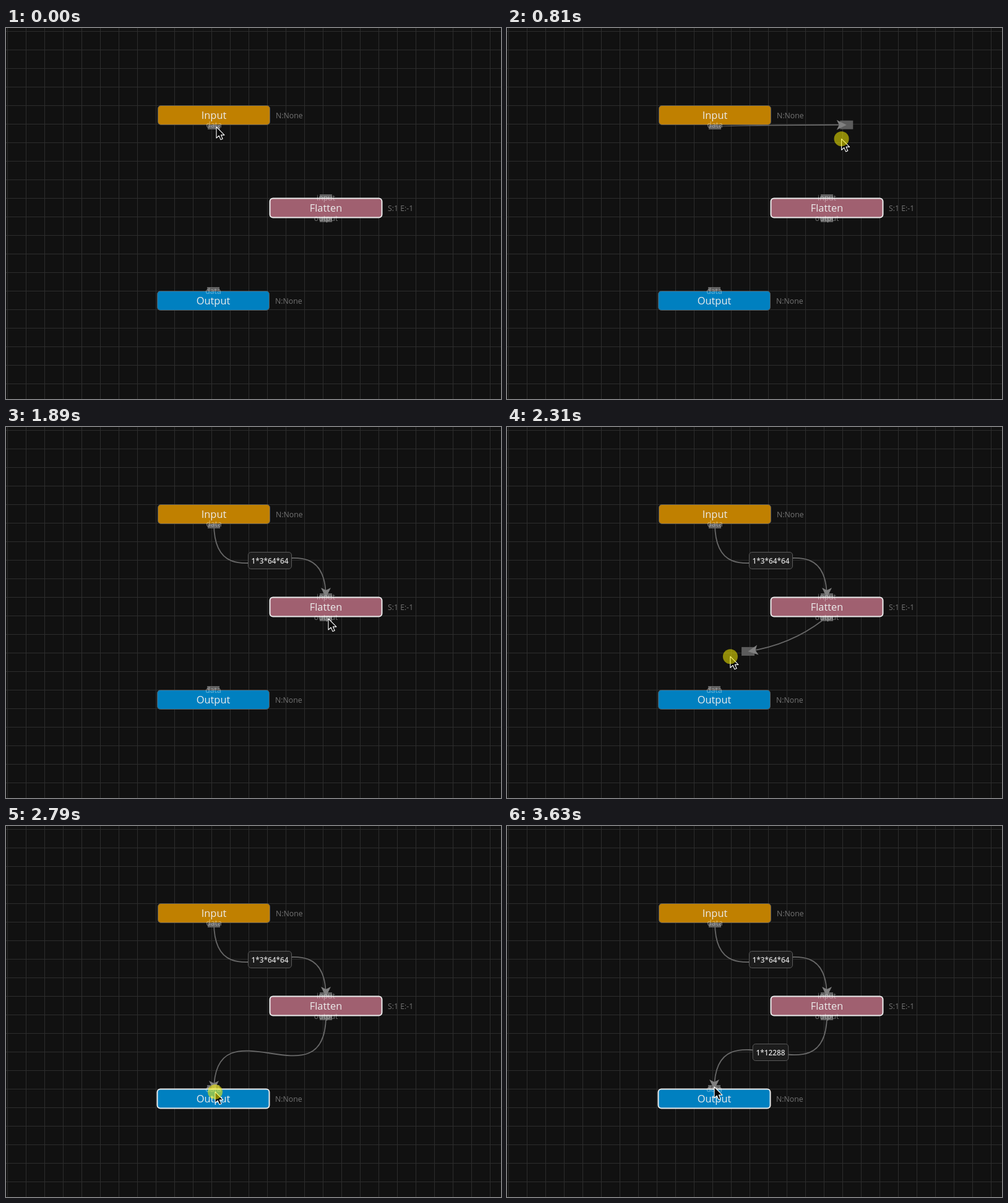
These frames come from a looping animation (800 by 600 pixels, 3.66 s). An HTML page:

```html
<!DOCTYPE html>
<html lang="en">
<head>
<meta charset="utf-8">
<title>Node editor</title>
<style>
html, body { margin: 0; width: 100%; height: 100%; overflow: hidden; background: #111; }
svg { display: block; width: 800px; height: 600px; font-family: "Open Sans", "Noto Sans", sans-serif; }
text { text-anchor: middle; }
.title { font-size: 16.4px; fill: #ececec; }
.side { font-size: 12.3px; fill: #747474; text-anchor: start; }
.port { font-size: 12.2px; fill: #fff; fill-opacity: .42; }
.size { font-size: 11.8px; font-weight: 600; fill: #d8d8d8; }
.link { fill: none; stroke: #686868; stroke-width: 1.8; }
.head { fill: #808080; }
</style>
</head>
<body>
<svg id="stage" viewBox="0 0 800 600">
  <defs>
    <pattern id="grid" x="2" y="5" width="30" height="30" patternUnits="userSpaceOnUse">
      <path d="M.5 0V30M0 .5H30" stroke="#2d2d2d" fill="none"/>
    </pattern>
  </defs>
  <rect width="800" height="600" fill="#111"/>
  <rect width="800" height="600" fill="url(#grid)"/>
  <g id="ports"></g>
  <g id="links"></g>
  <g id="nodes"></g>
  <g id="labels"></g>
  <path id="cursor" d="M0 0V18L4.2 14.2L7 20.6L10.2 19.2L7.4 13.1H13Z" fill="#060606" stroke="#fff" stroke-width="1.1" stroke-linejoin="round"/>
  <circle id="press" r="12" fill="#fff500" fill-opacity=".53"/>
</svg>
<script>
const LOOP = 3660, STEP = 30;
const $ = id => document.getElementById(id);

function add(parent, tag, attrs, text) {
  const el = document.createElementNS("http://www.w3.org/2000/svg", tag);
  for (const k in attrs) el.setAttribute(k, attrs[k]);
  if (text) el.textContent = text;
  parent.appendChild(el);
  return el;
}
const set = (el, attrs) => { for (const k in attrs) el.setAttribute(k, attrs[k]); };
const show = (el, on) => el.setAttribute("visibility", on ? "visible" : "hidden");

function addPort(cx, y, name, baseline) {
  add($("ports"), "rect", { x: cx - 10, y, width: 20, height: 14, fill: "#626262" });
  return () => add($("nodes"), "text", { x: cx, y: baseline, class: "port" }, name);
}

function addNode(x, y, fill, title, side) {
  const box = add($("nodes"), "rect", { x: x + .5, y: y + .5, width: 181, height: 31, rx: 5, fill });
  add($("nodes"), "text", { x: x + 91, y: y + 22, class: "title" }, title);
  add($("nodes"), "text", { x: x + 191, y: y + 21, class: "side" }, side);
  return box;
}
const select = (box, on) => set(box, { stroke: on ? "#ebebeb" : "#5c5c5c", "stroke-width": on ? 2 : 1 });

function addLabel(cx, cy, w, text) {
  const g = add($("labels"), "g", {});
  add(g, "rect", { x: cx - w / 2, y: cy - 13.5, width: w, height: 27, rx: 4.5, fill: "#1c1c1c", stroke: "#5a5a5a" });
  add(g, "text", { x: cx, y: cy + 4.5, class: "size" }, text);
  return g;
}

const portNames = [
  addPort(336, 150, "data", 161),
  addPort(517, 269, "input", 279),
  addPort(517, 300, "output", 311.5),
  addPort(335, 419, "data", 429.5)
];
const input = addNode(245, 125, "#c08000", "Input", "N:None");
const flatten = addNode(426, 275, "#a06070", "Flatten", "S:1 E:-1");
const output = addNode(244, 425, "#0080c0", "Output", "N:None");
portNames.forEach(draw => draw());
select(input, false);
select(flatten, true);

// bend: where the loose curve's control point lies between its two ends
const drags = [
  { press: 90, move: 420, snap: 870, release: 960, label: 960, lag: 30,
    grab: [340, 160], bend: [0, .86], hover: [[336, 156], [517, 276]], fixed: [[336, 156], [517, 276]],
    tag: addLabel(426.5, 216, 70, "1*3*64*64") },
  { press: 2010, move: 2160, snap: 2670, release: 3030, label: 3060, lag: 30,
    grab: [517, 307], bend: [.424, .8], hover: [[517, 307], [336, 428]], fixed: [[517, 306], [335, 426]],
    tag: addLabel(426, 366, 57.5, "1*12288") }
];
for (const d of drags) {
  d.line = add($("links"), "path", { class: "link" });
  d.dummy = add($("links"), "rect", { width: 21, height: 14, fill: "#5c5c5c" });
  d.head = add($("links"), "path", { class: "head", d: "M0 0L-16-8L-12 0L-16 8Z" });
}

// Cursor tip: time, x, y
const keys = [
  [0, 340, 160], [390, 340, 160], [480, 440, 232], [540, 502, 256], [620, 562, 236],
  [720, 566, 130], [800, 543, 172], [930, 517.5, 269], [1230, 517.5, 269], [1530, 521, 310],
  [2130, 521, 310], [2290, 380, 366], [2420, 258, 392], [2460, 272, 397], [2490, 275, 401],
  [2520, 275, 401], [2640, 338, 441], [2790, 338, 430], [2850, 335, 422], [LOOP, 335, 422]
];

function slope(i, axis) {
  const a = keys[i - 1], b = keys[i], c = keys[i + 1];
  const still = (p, q) => p[1] === q[1] && p[2] === q[2];
  return !a || !c || still(a, b) || still(b, c) ? 0 : (c[axis] - a[axis]) / (c[0] - a[0]);
}

function cursorAt(t) {
  let i = 0;
  while (i < keys.length - 2 && keys[i + 1][0] <= t) i++;
  const a = keys[i], b = keys[i + 1], span = b[0] - a[0], u = (t - a[0]) / span, v = 1 - u;
  return [1, 2].map(k =>
    a[k] * (1 + 2 * u) * v * v + b[k] * (3 - 2 * u) * u * u +
    span * u * v * (slope(i, k) * v - slope(i + 1, k) * u));
}

function drawDrag(d, t) {
  const moving = t >= d.move, loose = moving && t < d.snap;
  show(d.line, moving);
  show(d.head, moving);
  show(d.dummy, loose);
  show(d.tag, t >= d.label);
  if (!moving) return;
  let a, b, path, angle = 90;
  if (loose) {
    a = d.grab;
    b = cursorAt(t - d.lag);
    const c = a.map((p, k) => p + (b[k] - p) * d.bend[k]);
    path = `M${a}Q${c} ${b}`;
    angle = Math.atan2(b[1] - c[1], b[0] - c[0]) * 180 / Math.PI;
    set(d.dummy, { x: b[0] - 10.5, y: b[1] - 7 });
  } else {
    [a, b] = t < d.release ? d.hover : d.fixed;
    path = `M${a}C${a[0]} ${a[1] + 148} ${b[0]} ${b[1] - 148} ${b}`;
  }
  set(d.line, { d: path });
  set(d.head, { transform: `translate(${b}) rotate(${angle})` });
}

function draw(t) {
  drags.forEach(d => drawDrag(d, t));
  select(output, t >= drags[1].snap);
  const at = `translate(${cursorAt(t)})`;
  set($("cursor"), { transform: at });
  set($("press"), { transform: at });
  show($("press"), drags.some(d => t >= d.press && t < d.release));
}

const start = performance.now();
function tick() {
  const t = (performance.now() - start) % LOOP;
  draw(Math.floor(t / STEP) * STEP);
  requestAnimationFrame(tick);
}
tick();
</script>
</body>
</html>
```
